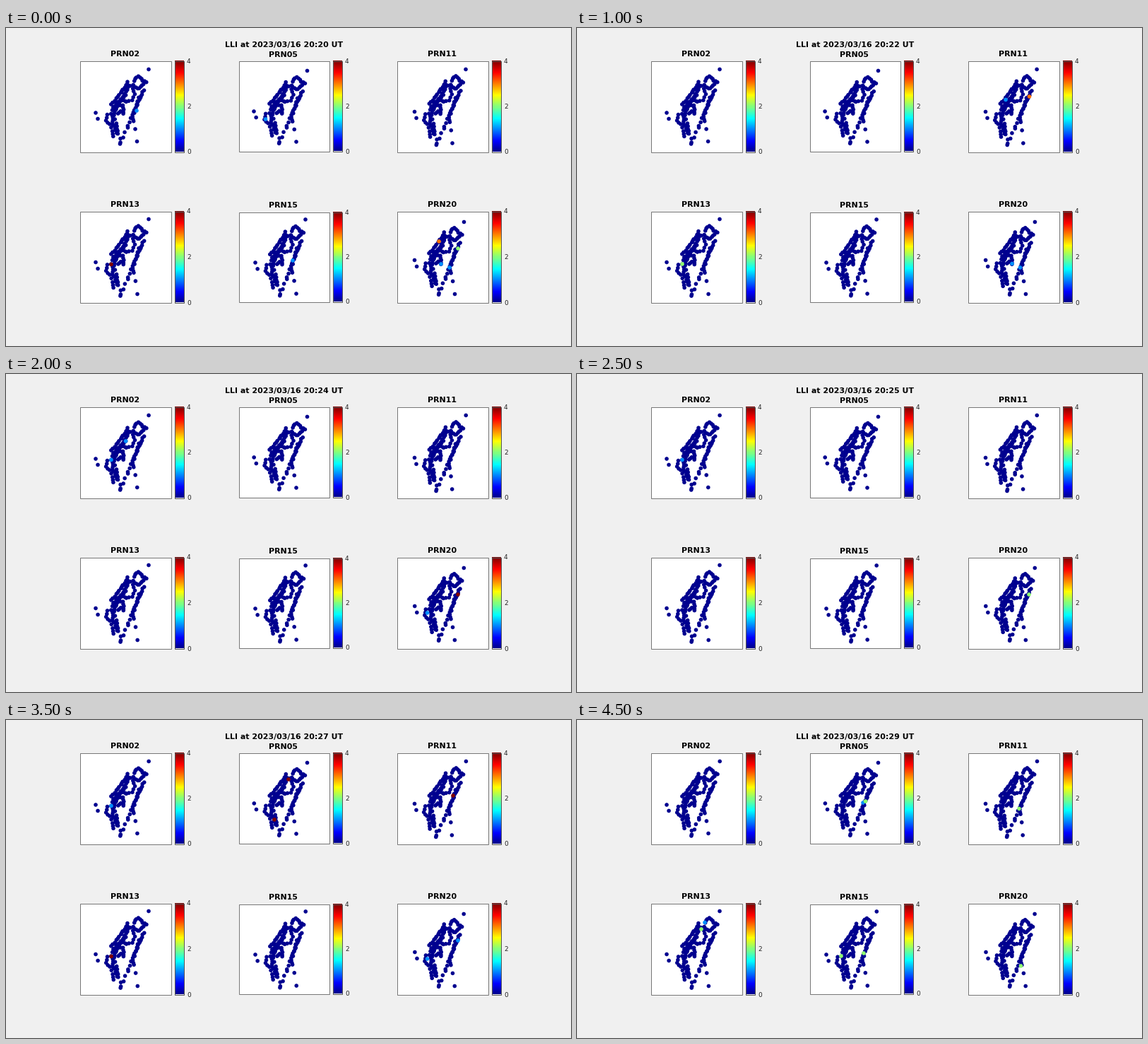
These frames come from a looping animation (800 px wide and 450 px high, 5000 ms). A matplotlib script:

```python
import numpy as np
import matplotlib.pyplot as plt
from matplotlib.animation import FuncAnimation
from matplotlib.patches import Rectangle

W, H, DPI = 800, 450, 100
FRAMES, INTERVAL = 10, 500
PX = 72 / DPI
DARK = "#262626"

# Station chains: number of stations and the bends of the path they follow
CHAINS = [
    (9, [(181, 75), (183, 71), (187.5, 68.5), (191, 71.5), (194, 75), (198, 76)]),
    (14, [(172.5, 76), (168, 85), (163, 90), (157, 99), (149, 108.5)]),
    (14, [(173, 80), (171, 88), (165, 98), (157, 106), (150, 116)]),
    (10, [(170, 95), (162, 104), (156, 114), (153, 124)]),
    (10, [(172, 84), (179, 80), (183, 84), (187, 86), (192, 83), (194, 79)]),
    (17, [(195, 88), (191, 97), (187, 104), (184, 112), (180, 121), (172, 138)]),
    (8, [(188, 98), (185, 107), (182, 117), (179, 127), (180, 132)]),
    (9, [(180, 86), (182, 93), (178, 102), (171, 104), (165, 103)]),
    (9, [(165, 98), (160, 108), (165, 110), (166, 116), (166, 121)]),
    (5, [(152, 111), (158, 121), (162, 117)]),
    (9, [(144, 122), (142, 131), (147, 136), (150, 146), (151, 153)]),
    (11, [(149, 121.5), (152, 127), (151, 135), (155, 140), (156, 149)]),
    (6, [(154, 129), (158, 138), (157, 144), (159, 150)]),
]
SINGLES = [(202, 58.5), (127, 120), (130, 128.5), (183, 143), (185.5, 160.5),
           (161.5, 164), (162, 162), (162, 156.5), (166, 155), (168, 147.5),
           (172.5, 141)]

# name, box (left, top, right, bottom), three anchors, x drift of the anchors
ANCHORS = [(202, 58.5), (127, 120), (185.5, 160.5)]
PANELS = [
    ("PRN02", (104.5, 46.5, 233.5, 175.5), ANCHORS, (0.2, 0, 0.5)),
    ("PRN05", (329.5, 46.5, 457.5, 174.5),
     [(426.5, 60.5), (351, 118), (411, 161)], (0, 0.4, 0)),
    ("PRN11", (553.5, 46.5, 682.5, 175.5),
     [(651, 58.5), (578.5, 118.5), (632, 163)], (0.5, 0, -0.8)),
    ("PRN13", (104.5, 259.5, 233.5, 388.5),
     [(202, 270.5), (127, 331.5), (186, 376.5)], (0, 0, 0.4)),
    ("PRN15", (329.5, 260.5, 457.5, 387.5),
     [(424, 271), (353, 332), (411, 376)], (0.3, 0, 0.3)),
    ("PRN20", (553.5, 259.5, 682.5, 388.5),
     [(648.5, 274.5), (578.5, 328.5), (635.5, 376.5)], (-0.4, 0.5, -0.3)),
]

# minute: (x, y, level) of the stations above zero
HITS = {
    0: [(185, 117, 1), (367.5, 129, 1), (149, 334.5, 4), (406, 329, 1),
        (613, 302, 3), (640, 312, 2), (616, 334, 1), (628, 339, 1)],
    1: [(374, 121, 1), (375, 334, 3), (613, 302, 1)],
    2: [(607, 101.5, 1), (640.5, 97, 3), (149, 334, 2), (616, 333.5, 1),
        (627.5, 339, 1)],
    4: [(149, 121.5, 1), (169.5, 95, 1), (640, 312, 4), (596.5, 338, 1)],
    5: [(149, 121.5, 1), (640, 312, 2)],
    6: [(149.5, 121.5, 1), (182, 116.5, 1), (400, 84, 4), (380, 141, 4),
        (639, 294, 1), (640, 312, 2), (628.5, 347, 1)],
    7: [(149, 121.5, 1), (400, 84, 4), (380, 141, 4), (633, 107, 4),
        (149, 334.5, 4), (640, 312, 1), (596.5, 338, 1)],
    9: [(405, 117, 1), (408.5, 115, 2), (626, 125.5, 2), (181, 286.5, 1),
        (176, 296, 2), (374, 334, 2), (406, 330, 2), (628.5, 348, 2)],
}


def jet(level):
    """Colour of a level from 0 to 4 in a 64-step jet map."""
    i = np.minimum(np.floor(np.asarray(level) * 16) + 1, 64)
    ramps = [np.minimum(i - lo, lo + 48 - i) / 16 for lo in (24, 8, -8)]
    return np.clip(np.stack(ramps, axis=-1), 0, 1)


def make_stations():
    rng = np.random.default_rng(4)
    parts = [np.array(SINGLES, float)]
    for n, bends in CHAINS:
        bends = np.array(bends, float)
        t = np.linspace(0, len(bends) - 1, n)
        k = np.arange(len(bends))
        path = np.column_stack([np.interp(t, k, bends[:, j]) for j in (0, 1)])
        parts.append(path + rng.uniform(-0.8, 0.8, path.shape))
    return np.vstack(parts)


def homog(points):
    points = np.asarray(points, float)
    return np.column_stack([points, np.ones(len(points))])


stations = homog(make_stations())
base = np.linalg.inv(homog(ANCHORS))


def place(anchors, drift, minute):
    target = np.array(anchors, float)
    target[:, 0] += np.array(drift) * minute / (FRAMES - 1)
    return stations @ base @ target


plt.rcParams["font.family"] = "DejaVu Sans"
fig = plt.figure(figsize=(W / DPI, H / DPI), dpi=DPI, facecolor="#f0f0f0")
ax = fig.add_axes([0, 0, 1, 1])
ax.axis("off")


def label(x, y, text, size=11, weight="bold", color="black", ha="center"):
    return ax.text(x, y, text, fontsize=size * PX, weight=weight, color=color,
                   ha=ha, va="baseline")


def frame_box(left, top, right, bottom, face, edge):
    ax.add_patch(Rectangle((left, top), right - left, bottom - top, fc=face,
                           ec=edge, lw=PX, zorder=2 if face == "none" else 0))


for name, (left, top, right, bottom), _, _ in PANELS:
    frame_box(left, top, right, bottom, "white", "#777777")
    label((left + right) / 2 - 0.8, 41 + (top > 200) * 213 - (name[3:] not in ("05", "15")),
          name)
    bar = right + 5.7
    if name in ("PRN05", "PRN15"):
        top = 47 if top < 200 else 260.5
    ramp = jet((np.arange(64) + 0.5) / 16)[::-1, None]
    ax.imshow(ramp, extent=(bar, bar + 13, bottom, top), aspect="auto",
              interpolation="nearest", zorder=1)
    frame_box(bar, top, bar + 13, bottom, "none", "#555555")
    for level in (0, 2, 4):
        y = bottom + (top - bottom) * level / 4
        label(bar + 16.7, y + 3, str(level), 9, "normal", DARK, "left")

ax.set_xlim(0, W)
ax.set_ylim(H, 0)
title = label(393.5, 27, "")
dots = ax.scatter([], [], s=(5.6 * PX) ** 2, linewidths=0, zorder=3)


def update(minute):
    title.set_text(f"LLI at 2023/03/16 20:{20 + minute} UT")
    quiet = np.vstack([place(a, d, minute) for _, _, a, d in PANELS])
    hits = np.array(HITS.get(minute, []), float).reshape(-1, 3)
    levels = np.concatenate([np.zeros(len(quiet)), hits[:, 2]])
    dots.set_offsets(np.vstack([quiet, hits[:, :2]]))
    dots.set_facecolors(jet(levels))
    return title, dots


anim = FuncAnimation(fig, update, frames=FRAMES, interval=INTERVAL,
                     repeat=True, repeat_delay=0, blit=False)
plt.show()
```
